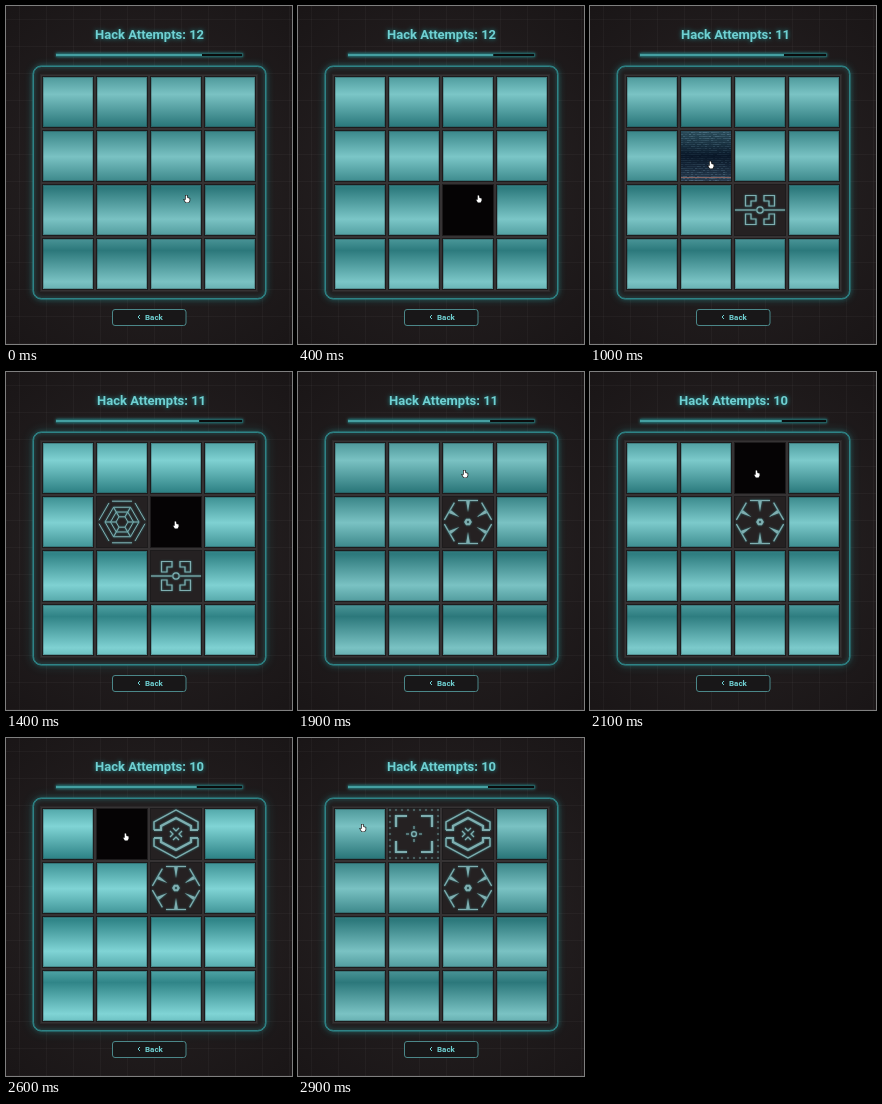
An HTML page with a canvas for the animation above (3000 ms loop, 286 by 338 pixels).

```html
<!DOCTYPE html>
<html lang="en">
<head>
<meta charset="utf-8">
<title>Hack Attempts</title>
<style>
html, body { margin: 0; width: 100%; height: 100%; overflow: hidden; background: #1d191a; }
canvas { display: block; }
</style>
</head>
<body>
<canvas id="stage" width="286" height="338"></canvas>
<script>
const ctx = document.getElementById('stage').getContext('2d');
const LOOP = 3000, STEP = 100, TILE = 50, PITCH = 54, LEFT = 37, TOP = 71;
const INK = '#7faeb0', TEXT = '#6fd0d2';

// Each click: tile, cursor position, times of opening and hiding, symbol
const clicks = [
  { col: 2, row: 2, x: 181, y: 193, open: 300, close: 1700, draw: brackets },
  { col: 1, row: 1, x: 121, y: 159, open: 800, close: 1700, draw: web },
  { col: 2, row: 1, x: 170, y: 153, open: 1300, close: LOOP, draw: rotor },
  { col: 2, row: 0, x: 167, y: 102, open: 2000, close: LOOP, draw: shield },
  { col: 1, row: 0, x: 120, y: 99, open: 2500, close: LOOP, draw: target },
  { col: 0, row: 0, x: 65, y: 90, open: LOOP }
];

// The pointer glides to each tile and rests there just before the click.
function cursorAt(t) {
  let { x, y } = clicks[0];
  for (const c of clicks.slice(1)) {
    const p = Math.min(1, Math.max(0, (t - c.open + 300) / 200));
    const e = p * p * (3 - 2 * p);
    x += (c.x - x) * e;
    y += (c.y - y) * e;
  }
  return [x, y];
}

// A pulse of one second that grows over the loop
function glowAt(t) {
  return (1 + Math.cos((t - 400) / 500 * Math.PI)) / 2 * t / 2400;
}

function random(seed) {
  return () => (seed = (seed * 16807) % 2147483647) / 2147483647;
}

function path(points, close) {
  ctx.beginPath();
  points.forEach(([x, y]) => ctx.lineTo(x, y));
  if (close) ctx.closePath();
}

function line(points, width = 1, close = false) {
  path(points, close);
  ctx.lineWidth = width;
  ctx.stroke();
}

function ring(r, width) {
  ctx.beginPath();
  ctx.arc(0, 0, r, 0, 7);
  ctx.lineWidth = width;
  ctx.stroke();
}

function spin(count, draw) {
  for (let i = 0; i < count; i++) {
    ctx.save();
    ctx.rotate(i * 2 * Math.PI / count);
    draw();
    ctx.restore();
  }
}

function hexagon(r) {
  return Array.from({ length: 6 }, (_, i) => [r * Math.cos(i * Math.PI / 3), r * Math.sin(i * Math.PI / 3)]);
}

function brackets() {
  spin(4, () => line([[-4, -14.5], [-14.5, -14.5], [-14.5, -4], [-9, -4], [-9, -9], [-4, -9]], 1.2, true));
  spin(2, () => line([[4, 0], [25, 0]], 1.2));
  ring(3.2, 1.2);
}

function web() {
  ctx.setLineDash([20, 4]);
  ctx.lineDashOffset = -2;
  line(hexagon(24), 1, true);
  ctx.setLineDash([]);
  for (const r of [17, 11.5, 6]) line(hexagon(r), 1, true);
  spin(6, () => line([[6, 0], [17, 0]], 1));
}

function rotor() {
  spin(6, () => {
    line([[-10, -21.5], [10, -21.5]], 1.2);
    path([[-1.8, -21], [1.8, -21], [0, -10]], true);
    ctx.fill();
  });
  line(hexagon(2.6), 2.2, true);
}

function shield() {
  spin(2, () => {
    line([[-22, -4], [-22, -12], [0, -24], [22, -12], [22, -4]], 1.4);
    line([[-22, -4], [-15, -4], [-15, -8], [0, -16], [15, -8], [15, -4], [22, -4]], 2.2);
  });
  spin(4, () => line([[-3, -6], [0, -3], [3, -6]], 1.2));
}

function target() {
  spin(4, () => {
    for (let x = -24; x < 24; x += 6) ctx.fillRect(x - .6, -24.6, 1.2, 1.2);
    line([[-18, -7], [-18, -18], [-7, -18]], 2.2);
    line([[0, -8], [0, -5]], 1);
  });
  ring(2.4, 1.4);
}

function background() {
  const shade = ctx.createRadialGradient(143, 169, 60, 143, 169, 230);
  shade.addColorStop(0, '#252021');
  shade.addColorStop(1, '#191516');
  ctx.fillStyle = shade;
  ctx.fillRect(0, 0, 286, 338);
  ctx.fillStyle = 'rgba(255,255,255,.03)';
  for (let p = 13; p < 338; p += 27) {
    ctx.fillRect(p, 0, 1, 338);
    ctx.fillRect(0, p, 286, 1);
  }
}

function box(x, y, size, fill) {
  ctx.fillStyle = fill;
  ctx.fillRect(x, y, size, size);
}

function frame(x, y, w, h, r, color, blur) {
  ctx.save();
  ctx.shadowColor = '#2fa3a6';
  ctx.shadowBlur = blur;
  ctx.strokeStyle = color;
  ctx.lineWidth = 1;
  ctx.beginPath();
  ctx.roundRect(x, y, w, h, r);
  ctx.stroke();
  ctx.restore();
}

function label(text, x, y, size, blur) {
  ctx.save();
  ctx.font = `bold ${size}px Roboto, sans-serif`;
  ctx.fillStyle = TEXT;
  ctx.shadowColor = '#1f8f92';
  ctx.shadowBlur = blur;
  ctx.fillText(text, x, y);
  ctx.restore();
}

function header(t) {
  // Every second click costs one attempt.
  const pairs = Math.floor(clicks.filter(c => t >= c.open).length / 2);
  label(`Hack Attempts: ${12 - pairs}`, pairs === 1 ? 91 : 89, 33, 13, 4);
  const end = 196 - 2.07 * t / 1000;
  ctx.save();
  ctx.shadowColor = '#2a8f92';
  ctx.shadowBlur = 3;
  ctx.fillStyle = '#235c5e';
  ctx.fillRect(50, 47, 187, 4);
  ctx.restore();
  ctx.fillStyle = '#0a0c0d';
  ctx.fillRect(end, 48, 236 - end, 2);
  ctx.fillStyle = '#459fa1';
  ctx.fillRect(50, 48, end - 50, 2);
}

function sheenFill(glow) {
  const mix = (a, b) => a + (b - a) * glow;
  const dark = `rgb(${mix(44, 50)},${mix(120, 138)},${mix(123, 141)})`;
  const light = `rgb(${mix(122, 130)},${mix(194, 220)},${mix(195, 220)})`;
  const sheen = ctx.createLinearGradient(0, 57, 0, 307);
  for (let i = 0; i <= 8; i++) sheen.addColorStop(i / 8, i % 2 ? light : dark);
  return sheen;
}

function glitch(x, y) {
  const rnd = random(77);
  const night = ctx.createLinearGradient(0, y, 0, y + TILE);
  night.addColorStop(0, '#2a4c5a');
  night.addColorStop(.5, '#081627');
  night.addColorStop(1, '#26394c');
  box(x, y, TILE, night);
  for (let row = 1; row < TILE; row += 2) {
    const strength = .1 + .4 * Math.abs(row / 25 - 1);
    for (let col = 0; col < TILE; col += 2) {
      ctx.fillStyle = `rgba(110,150,170,${rnd() * strength})`;
      ctx.fillRect(x + col, y + row, 2, 1);
    }
  }
  ctx.fillStyle = '#86625f';
  ctx.fillRect(x, y + 46, TILE, 1);
}

function openTile(x, y, age, draw) {
  box(x, y, TILE, age < 200 ? '#050304' : '#252122');
  if (age < 200) return;
  if (age < 300) return glitch(x, y);
  ctx.save();
  ctx.translate(x + 25, y + 25);
  ctx.strokeStyle = ctx.fillStyle = INK;
  ctx.shadowColor = '#3f8d90';
  ctx.shadowBlur = 2;
  draw();
  ctx.restore();
}

function board(t, glow) {
  frame(27, 60, 233, 233, 8, '#2f8386', 7 + glow * 4);
  ctx.fillStyle = '#211e1f';
  ctx.beginPath();
  ctx.roundRect(28, 61, 231, 231, 7);
  ctx.fill();
  frame(27.5, 60.5, 232, 232, 8, '#2f8386', 4);
  box(34, 68, 218, '#2b2829');
  const sheen = sheenFill(glow);
  for (let i = 0; i < 16; i++) {
    const col = i % 4, row = i >> 2;
    const x = LEFT + col * PITCH, y = TOP + row * PITCH;
    box(x - 2, y - 2, TILE + 4, '#353233');
    box(x - 1, y - 1, TILE + 2, '#1d1b1c');
    const click = clicks.find(c => c.col === col && c.row === row && t >= c.open && t < c.close);
    if (click) {
      openTile(x, y, t - click.open, click.draw);
    } else {
      box(x, y, TILE, sheen);
      ctx.strokeStyle = 'rgba(20,35,37,.25)';
      ctx.lineWidth = 1;
      ctx.strokeRect(x + .5, y + .5, TILE - 1, TILE - 1);
    }
  }
}

function backButton() {
  ctx.fillStyle = '#181718';
  ctx.fillRect(107, 304, 73, 15);
  frame(106.5, 303.5, 73.5, 16, 2.5, '#4b8789', 0);
  ctx.strokeStyle = TEXT;
  line([[134, 309], [132, 311], [134, 313]]);
  label('Back', 139, 314, 8, 0);
}

function hand(x, y) {
  ctx.save();
  ctx.translate(x, y);
  ctx.scale(.85, .85);
  path([[-1.5, -4], [0, -4], [.5, -1.2], [3, -.5], [3, 2], [1.8, 4], [-1.3, 4], [-3.3, 1], [-1.5, .8]], true);
  ctx.strokeStyle = '#111';
  ctx.lineWidth = 1.6;
  ctx.stroke();
  ctx.fillStyle = '#fff';
  ctx.fill();
  ctx.restore();
}

function render(now) {
  const t = Math.floor(now % LOOP / STEP) * STEP;
  background();
  header(t);
  board(t, glowAt(t));
  backButton();
  hand(...cursorAt(t));
  requestAnimationFrame(render);
}
requestAnimationFrame(render);
</script>
</body>
</html>
```
